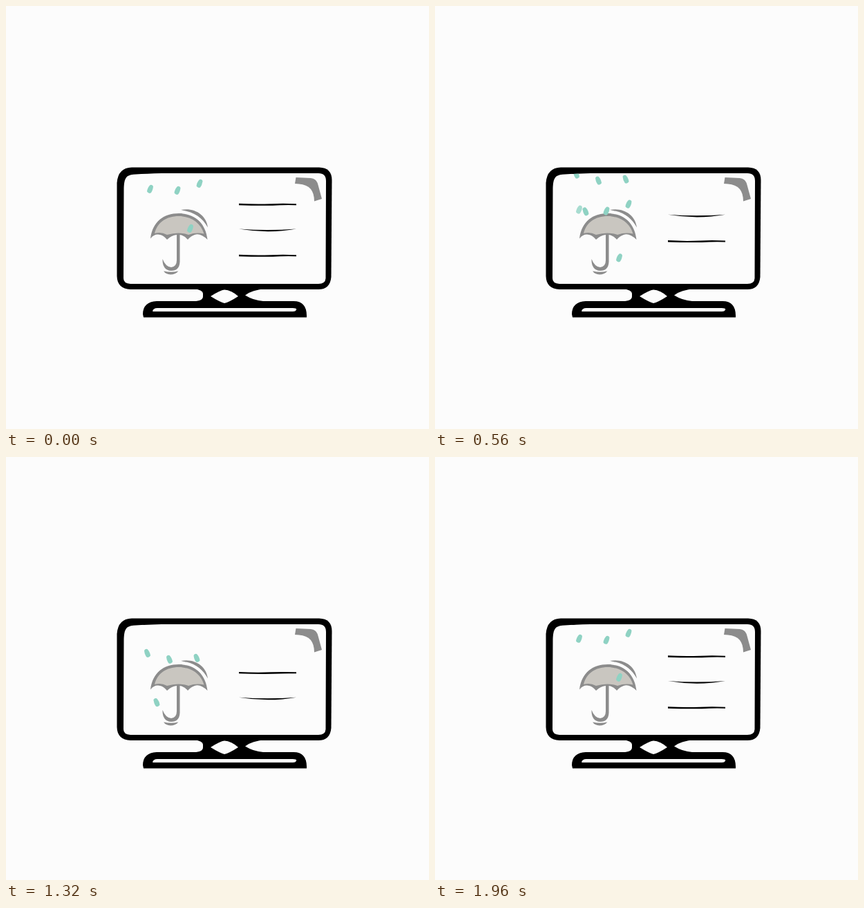
Recreate the animation shown at these times as an HTML page. Size 612 by 612 pixels, loop 2 s.

```html
<!DOCTYPE html>
<html lang="en">
<head>
<meta charset="utf-8">
<title>Rain forecast on a screen</title>
<style>
  html, body { margin: 0; width: 100%; height: 100%; overflow: hidden; background: #fcfcfc; }
  svg { display: block; width: 612px; height: 612px; }
  .grey { fill: #8c8c8c; }
  .paper { fill: #fcfcfc; }
</style>
</head>
<body>
<svg viewBox="0 0 612 612">
  <defs>
    <clipPath id="screen"><path d="M171 244.5Q190 243 225 242H463V402H171Z"/></clipPath>
  </defs>

  <!-- monitor and stand -->
  <path d="M182 233.500H453Q471.500 234 471.500 252L470.500 392Q469 410 452 410H180Q161 409 160.500 391V256Q162 234 182 233.500Z"/>
  <path class="paper" d="M188 243.500Q203 242.500 225 242H452Q463 242 463 253L462.500 394Q462 402 452 402H180Q170 401.500 170 394L170.500 264C171 248 174 244 188 243.500Z"/>
  <path d="M272 409Q285 411 285 416V420Q285 427 272 427H218Q198 428 198 446L199 450.500H435Q436 427 416 427H372Q358 426 346 418.500Q356 410.500 376 409Z"/>
  <path class="paper" d="M296 420Q310 411 316 410.500Q326 411 336 420Q322 429 316 430Q309 428 296 420Z"/>
  <path class="paper" d="M212 441.500Q213 437 219 437H415Q421 437 420 439.500Q419 442 415 442H213Z"/>
  <path class="grey" d="M419.500 248L441 249Q449 250 451 257L457 279L446 282.500Q446 259 424 257.500L418 257Z"/>

  <!-- umbrella -->
  <path class="grey" d="M209 336.500C212 312 228 300 250 300C273 300 289 314 291.500 338Q281 328 273 331Q267 333 263 338Q258 332 251.500 331V370Q251 383 239 383Q226 382 226.500 366Q231 377.500 239 378Q247 377 247 368V331Q239 332 233 338Q228 332 223 331Q215 329 209 336.500Z"/>
  <path fill="#c9c6c0" d="M215 329C219 313 232 304 250 304C268 304 282 314 286.500 329.500Q275 327 264 331Q250 326 233 331Q224 326 215 329Z"/>
  <path class="grey" d="M228 383.500Q239 386 249.500 383.500Q245 388.500 238 388.500Q231 388 228 383.500Z"/>
  <path class="grey" d="M253 295C272 291 290 302 292 320.500C284 306 273 298 253 295Z"/>

  <g id="lines"></g>
  <g id="rain" fill="#8fd2c3" clip-path="url(#screen)"></g>
</svg>
<script>
const LOOP = 2000, HALF = LOOP / 2, STEP = 40;
const ROW = 37; // distance between text lines, climbed once per half loop

const DROP = "M0-6Q3-7 4.500-4Q4 2 1 5.500Q-2 7-4.500 3.500Q-4-2 0-6Z";
const FLAT = "M337-1.200Q362 .2 383-.8Q400-1.600 420-.8V1.200Q400 .8 386 1.700Q362 2 337 1.200Z";
const TAPERED = "M337-1.500Q378 1.500 420-1.500Q400 2 379 2.200Q358 2 337-1.500Z";

// each wave: three slow drops and one fast drip, as x and height at its beat
const waves = [
  { slow: [[208.500, 265], [248, 267], [280, 257]], drip: [266.500, 322] },
  { slow: [[204.500, 267], [236.500, 276], [276, 274]], drip: [218, 331] }
];

const mod = (a, n) => ((a % n) + n) % n;
const clamp = v => Math.max(0, Math.min(1, v));

function add(parent, d) {
  const path = document.createElementNS("http://www.w3.org/2000/svg", "path");
  path.setAttribute("d", d);
  return document.getElementById(parent).appendChild(path);
}

function place(node, x, y, alpha, flip = 1) {
  node.setAttribute("transform", `translate(${x} ${y}) scale(${flip} 1)`);
  node.setAttribute("opacity", clamp(alpha));
}

const drops = waves.flatMap(({ slow, drip }, wave) =>
  [...slow, drip].map(([x, y], i) => ({ x, y, wave, fast: i === 3, node: add("rain", DROP) })));
const lines = [0, 1, 2, 3].map(i => add("lines", i % 2 ? TAPERED : FLAT));

function draw(t) {
  for (const { x, y, wave, fast, node } of drops) {
    const beat = mod(t - wave * HALF + 800, LOOP) - 800;
    const height = y + beat * (fast ? .076 : .053);
    // slow drops vanish lower near the middle of the umbrella
    const end = fast ? 396 : 328 - Math.abs(x - 250) / 2;
    const alpha = Math.min(fast ? (height - 280) / 12 : 1, (end - height) / 16);
    place(node, x, height, alpha, wave ? -1 : 1);
  }
  lines.forEach((node, i) => {
    const y = 398 - mod(t + (1 - i) * HALF, 2 * LOOP) / HALF * ROW;
    place(node, 0, y, Math.min((y - 276) / 8, (371 - y) / 8));
  });
}

const origin = performance.now();
function tick() {
  const t = mod(performance.now() - origin, LOOP);
  draw(Math.floor(t / STEP) * STEP);
  requestAnimationFrame(tick);
}
draw(0);
requestAnimationFrame(tick);
</script>
</body>
</html>
```
